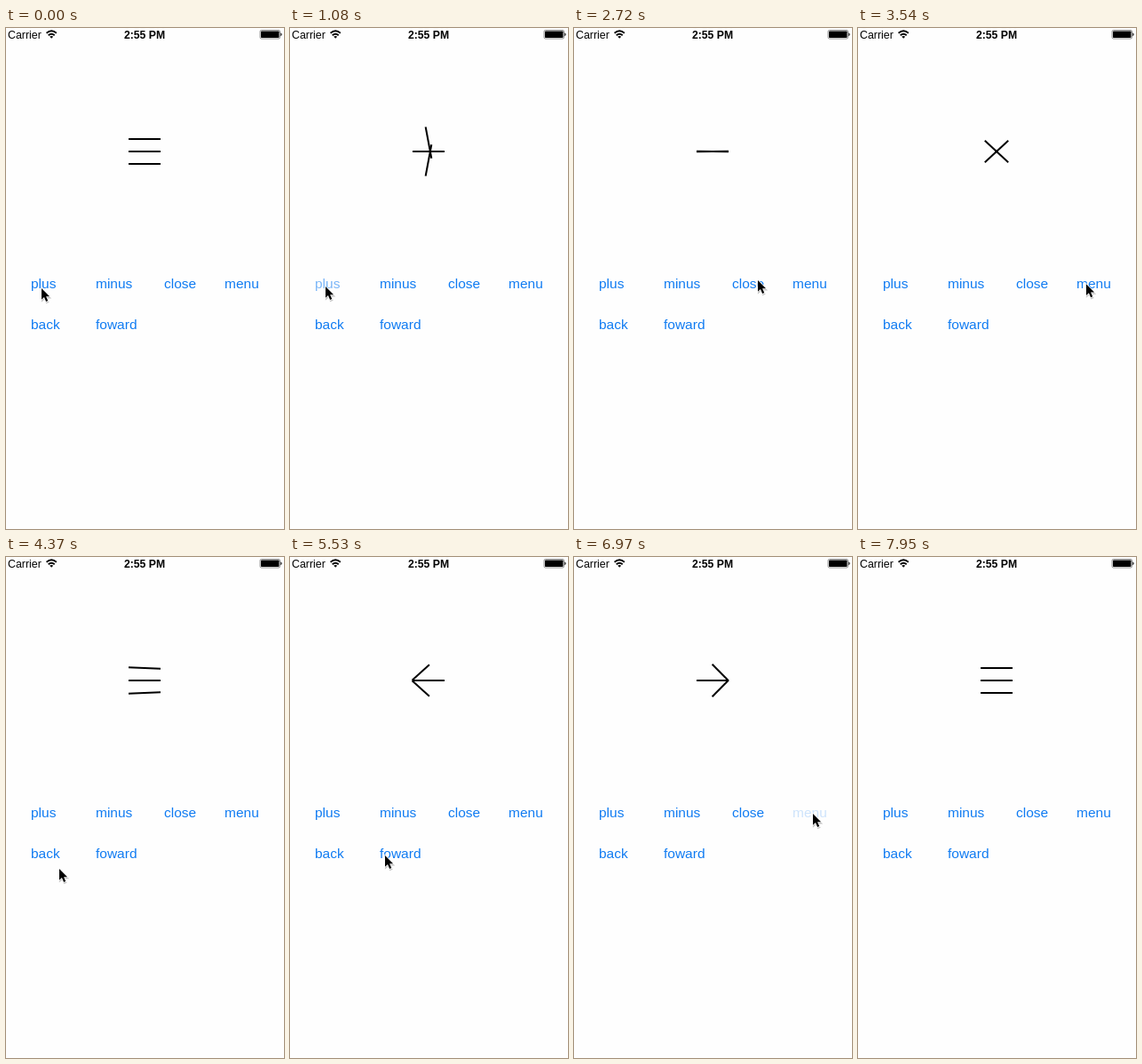
Animation of 313x564 px, one loop 8.64 s. Source, as an HTML page:

```html
<!DOCTYPE html>
<html lang="en">
<head>
<meta charset="utf-8">
<title>Morphing menu icon</title>
<style>
  html, body { margin: 0; width: 100%; height: 100%; overflow: hidden; background: #fefefe; }
  svg { display: block; width: 313px; height: 564px; }
  text { font-family: "Liberation Sans", Arial, sans-serif; }
  #buttons { font-size: 15.5px; fill: #0f7bf2; }
  #icon { stroke: #000; stroke-width: 2; }
  #wifi { fill: none; stroke: #000; stroke-width: 1.9; }
</style>
</head>
<body>
<svg viewBox="0 0 313 564">
  <defs><path id="arrow" d="M0 0V14.5L3.4 11.5L5.8 17L8.2 16L5.8 10.6H10.4Z"/></defs>
  <g font-size="12.4">
    <text x="2" y="11.5">Carrier</text>
    <text x="133" y="11.5" font-weight="bold" font-size="12.2">2:55 PM</text>
  </g>
  <g id="wifi">
    <path d="M45.6 5.8Q51.2 0.9 56.8 5.8M47.7 8.2Q51.2 5.2 54.7 8.2"/>
    <path d="M49.2 9.7Q51.2 8.2 53.2 9.7L51.2 11.8Z" fill="#000" stroke="none"/>
  </g>
  <rect x="286" y="2.5" width="22.5" height="9.5" rx="1.5" fill="none" stroke="#777" stroke-width=".8"/>
  <rect x="287" y="3.5" width="20.5" height="7.5" rx=".7"/>
  <path d="M309.3 5.3Q312 7.2 309.3 9.2Z"/>
  <g id="icon" transform="translate(156 139)">
    <line id="top"/>
    <line id="mid" x1="-18" x2="18"/>
    <line id="low"/>
  </g>
  <g id="buttons">
    <text x="28" y="293">plus</text>
    <text x="101" y="293">minus</text>
    <text x="178" y="293">close</text>
    <text x="246" y="293">menu</text>
    <text x="28" y="339">back</text>
    <text x="101" y="339">foward</text>
  </g>
  <g id="cursor">
    <g transform="translate(1 1) scale(.88)">
      <use href="#arrow" x=".6" y="1.6" stroke="#000" stroke-width="1.5" opacity=".22"/>
      <use href="#arrow" stroke="#fff" stroke-width="1.6" paint-order="stroke"/>
    </g>
  </g>
</svg>
<script>
const LOOP = 8640, HOLD = 150, FADE = 220, GLIDE = 400;
const $ = id => document.getElementById(id);
const labels = document.querySelectorAll("#buttons text");
const clamp = v => Math.min(1, Math.max(0, v));
const mix = (a, b, p) => a + (b - a) * p;
const smooth = u => u * u * (3 - 2 * u);

// Upper bar's angle, offset from the icon centre and half length, then the
// middle bar's opacity. The lower bar mirrors the upper one.
const stacked = angle => [angle, 0, -14, 18, 1];
const centred = (angle, mid) => [angle, 0, 0, 18, mid];
const arrow = (angle, side) => [angle, side * 8.8, -9, 13, 1];

// button index, press time, resulting pose
const taps = [
  [0, 835, centred(270, 1)],
  [1, 1915, centred(180, 1)],
  [2, 2780, centred(315, 0)],
  [3, 3805, stacked(360)],
  [4, 4805, arrow(495, -1)],
  [5, 5960, arrow(405, 1)],
  [3, 6930, stacked(360)]
];

// arrival time and place of the pointer
const stops = [
  [0, 39, 292], [560, 39, 290], [1720, 112, 295], [2670, 206, 283], [3640, 265, 288],
  [4360, 59, 350], [4760, 42, 340], [5490, 106, 335], [6780, 268, 288], [7800, 271, 585]
];

// Underdamped spring from 0 to 1, t in ms
function spring(t) {
  const decay = 7, freq = 7.3, s = t / 1000;
  return 1 - Math.exp(-decay * s) * (Math.cos(freq * s) + decay / freq * Math.sin(freq * s));
}

// Only the angle overshoots; the rest stops at its goal.
function pose(t) {
  let from = stacked(0), to = from, began = 0;
  for (const [, press, next] of taps)
    if (t >= press + HOLD) [from, to, began] = [to, next, press + HOLD];
  const p = spring(t - began);
  return from.map((v, i) => mix(v, to[i], i ? clamp(p) : p));
}

function pointer(t) {
  let x = 0, y = 0;
  for (const [arrive, stopX, stopY] of stops) {
    const p = smooth(clamp((t - arrive) / GLIDE + 1));
    x = mix(x, stopX, p);
    y = mix(y, stopY, p);
  }
  return [x, y];
}

function place(bar, angle, x, y, half) {
  bar.setAttribute("transform", `translate(${x} ${y}) rotate(${angle})`);
  bar.setAttribute("x1", -half);
  bar.setAttribute("x2", half);
}

function draw(t) {
  const [angle, x, y, half, mid] = pose(t);
  place($("top"), angle, x, y, half);
  place($("low"), -angle, x, -y, half);
  $("mid").setAttribute("opacity", mid);

  labels.forEach((label, i) => {
    let opacity = 1;
    for (const [button, press] of taps)
      if (button === i && t >= press) opacity = mix(0.2, 1, clamp((t - press - HOLD) / FADE));
    label.setAttribute("opacity", opacity);
  });

  $("cursor").setAttribute("transform", `translate(${pointer(t)})`);
}

const begin = performance.now();
function tick() {
  draw((performance.now() - begin) % LOOP);
  requestAnimationFrame(tick);
}
tick();
</script>
</body>
</html>
```
